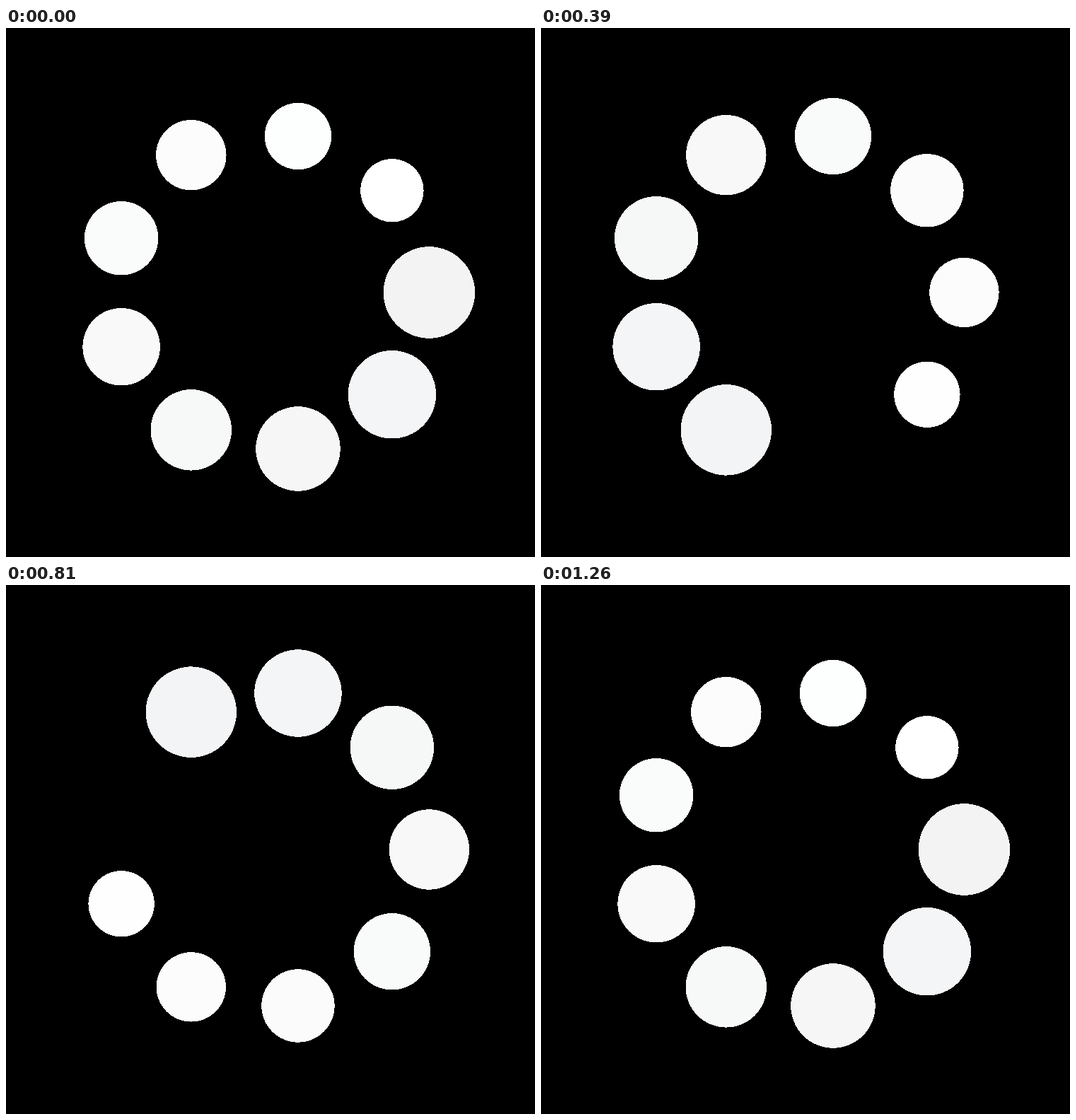
An HTML page that plays this animation: 748x748 px, repeating every 1290 ms.

```html
<!DOCTYPE html>
<html>
<head>
<meta charset="utf-8">
<title>Spinner</title>
<style>
  html, body { margin: 0; height: 100%; overflow: hidden; background: #000; }
  svg { display: block; width: 748px; height: 748px; shape-rendering: crispEdges; }
</style>
</head>
<body>
<svg viewBox="0 0 748 748"></svg>
<script>
const COUNT = 9, CENTER = 374, ORBIT = 224.4;
const RADIUS = 44.7, GROWTH = 22.6;
const STEP = 30, CYCLE = 1260, LOOP = CYCLE + STEP;
const HIDE_AFTER = 1215;
const FADE = [14, 13, 12]; // white drifts toward #f1f2f3

const svg = document.querySelector('svg');
const dots = Array.from({ length: COUNT }, (_, i) => {
  const dot = document.createElementNS('http://www.w3.org/2000/svg', 'circle');
  const angle = i / COUNT * 2 * Math.PI;
  dot.setAttribute('cx', CENTER + ORBIT * Math.cos(angle));
  dot.setAttribute('cy', CENTER + ORBIT * Math.sin(angle));
  return svg.appendChild(dot);
});

function draw(now) {
  const time = Math.floor(now % LOOP / STEP) * STEP;
  dots.forEach((dot, i) => {
    const age = (time + CYCLE - (i + 1) * CYCLE / COUNT) % CYCLE;
    const progress = age / CYCLE;
    const color = FADE.map(fade => Math.round(255 - fade * progress));
    // Each dot grows, vanishes briefly, then restarts small.
    dot.setAttribute('r', age > HIDE_AFTER ? 0 : RADIUS + GROWTH * progress);
    dot.setAttribute('fill', `rgb(${color})`);
  });
}

function tick() {
  draw(performance.now());
  requestAnimationFrame(tick);
}
tick();
</script>
</body>
</html>
```
